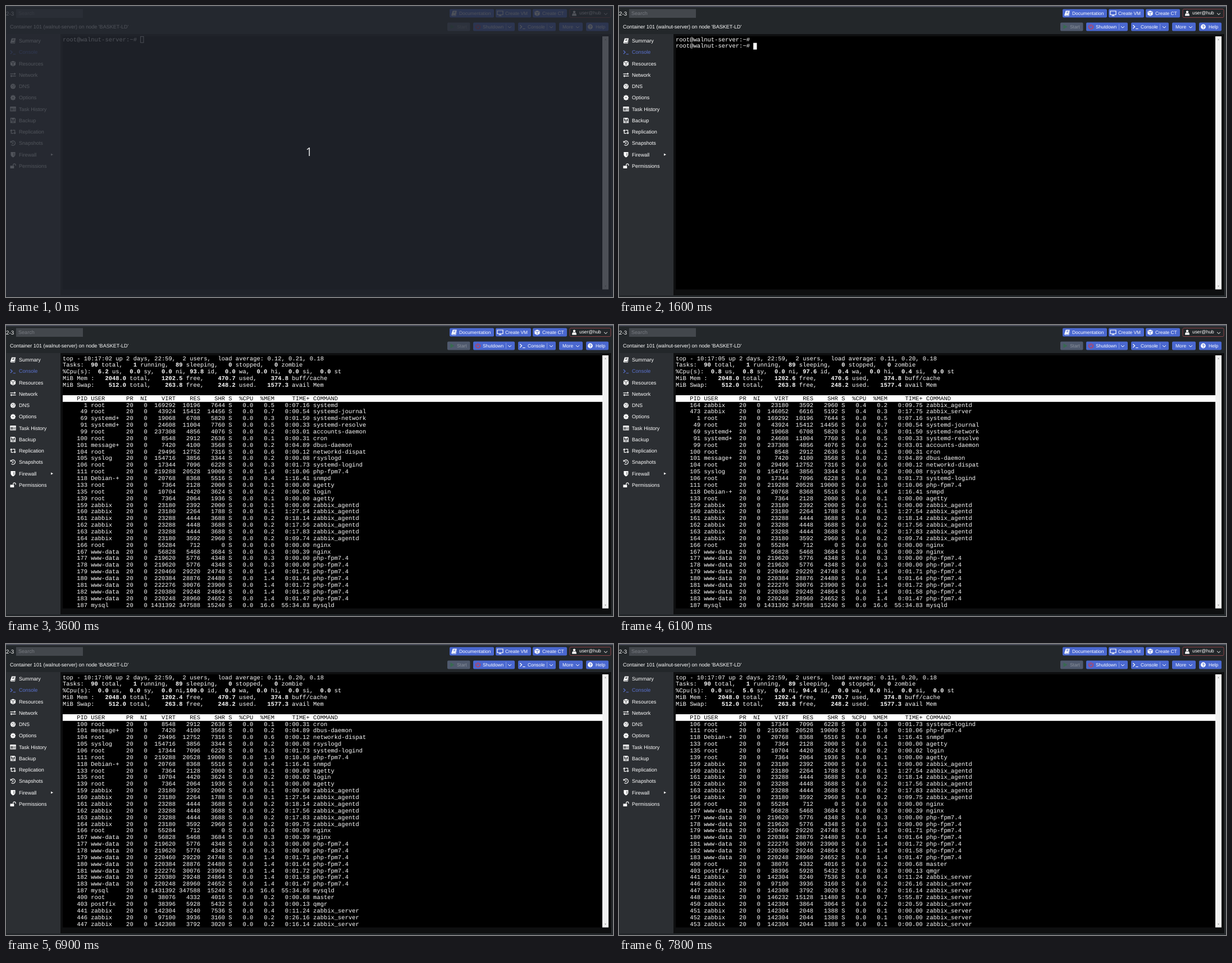
These frames come from a looping animation (1081x518 px, 8000 ms). An HTML page with a canvas:

```html
<!DOCTYPE html>
<html lang="en">
<head>
<meta charset="utf-8">
<title>Container console</title>
<style>
html, body { margin: 0; width: 100%; height: 100%; overflow: hidden; background: #23272a; }
canvas { display: block; width: 1081px; height: 518px; }
</style>
</head>
<body>
<canvas id="stage" width="1081" height="518"></canvas>
<script>
const ctx = document.getElementById('stage').getContext('2d');
const LOOP = 8000;
const ZOOM = 0.698;
const SANS = '"Liberation Sans", Arial, sans-serif';
const MONO = '"Liberation Mono", "Courier New", monospace';
const HEAD = '#23272a', SIDE = '#2c2f33', BLUE = '#4a68d0';
const CELL = { x: 101, y: 53.8, w: 9 * ZOOM, h: 17 * ZOOM };
const PROMPT = 'root@walnut-server:~# ';

function box(x, y, w, h, color) {
  ctx.fillStyle = color;
  ctx.fillRect(x, y, w, h);
}

function text(str, x, y, size, color = '#fff', family = SANS, weight = '') {
  ctx.save();
  ctx.translate(x, y);
  ctx.scale(ZOOM, ZOOM);
  ctx.font = `${weight} ${size}px ${family}`;
  ctx.textRendering = 'geometricPrecision';
  ctx.fillStyle = color;
  ctx.fillText(str, 0, 0);
  ctx.restore();
}

// Icons sit in a 10 px box around their centre: filled, stroked and cut-out parts.
const ICONS = {
  book: ['M-2.3 -4.5H4.8L2.6 3H-3Q-3.6 3.6 -3 3.8H3L4.8 -2V-1L3.3 4.7H-3.5Q-5.2 4 -4.6 2.4Z', '', 'M-1 -2.4H2.6M-1.5 -.6H2'],
  prompt: ['', 'M-4.6 -3L-1.4 0L-4.6 3M.2 3.5H4.6', ''],
  cube: ['M0 -4.8L4.6 -3V2.6L0 5L-4.6 2.6V-3Z', '', 'M-3.8 -2.5L0 -1L3.8 -2.5M0 -1V4'],
  swap: ['M2.4 -4.2L5 -1.9L2.4 .2ZM-2.4 -.2L-5 1.9L-2.4 4.2Z', 'M-5 -1.9H3M5 1.9H-3', ''],
  globe: ['M-4.5 0A4.5 4.5 0 1 1 4.5 0A4.5 4.5 0 1 1 -4.5 0Z', '', 'M-2.2 -2.6L-.5 -1.6L-2.4 .4M1 -3L2.6 -1.4L1.2 .6L2.4 2M-1 1.6L.2 3'],
  gear: ['M-1 -4.6H1L1.4 -3.2L2.7 -4L4 -2.7L3.2 -1.4L4.6 -1V1L3.2 1.4L4 2.7L2.7 4L1.4 3.2L1 4.6H-1L-1.4 3.2L-2.7 4L-4 2.7L-3.2 1.4L-4.6 1V-1L-3.2 -1.4L-4 -2.7L-2.7 -4L-1.4 -3.2Z', '', 'M-.7 0A.7 .7 0 1 1 .7 0A.7 .7 0 1 1 -.7 0Z'],
  list: ['M-5 -4H5V-1.8H-5Z', 'M-4.5 -3.5H4.5V3.5H-4.5ZM-3 -.5H-2M-1 -.5H3.5M-3 1.6H-2M-1 1.6H3.5', ''],
  disk: ['M-2 -4H2V-1.2H-2Z', 'M-4 -4H2.6L4 -2.6V4H-4ZM-2.3 4V1.2H2.3V4', ''],
  cycle: ['M-3.2 -4.4L-.8 -1.5H-5.5ZM3.2 4.4L.8 1.5H5.5Z', 'M-3.2 -2V2.7H1M3.2 2V-2.7H-1', ''],
  history: ['M-4.8 -4.4V-.8H-1.3Z', 'M-3.2 -2.5A4 4 0 1 1 -3 2.7M0 -2V.6H-1.8', ''],
  shield: ['M-4 -4.5H4V0Q4 3 0 5Q-4 3 -4 0Z', '', 'M1.5 -2.8V2.2'],
  lock: ['M-5 -.3H1.8V4.4H-5Z', 'M.3 -.3V-2A2.2 2.2 0 0 1 4.6 -2V-.4', ''],
  screen: ['M-2.5 4H2.5V5H-2.5Z', 'M-5 -4H5V2.5H-5ZM0 2.5V4.5', ''],
  user: ['M-2.2 -2.3A2.2 2.3 0 1 1 2.2 -2.3A2.2 2.3 0 1 1 -2.2 -2.3ZM-3.9 4.4Q-4 .2 -1.8 .1Q0 1.2 1.8 .1Q4 .2 3.9 4.4Z', '', ''],
  play: ['M-3 -4L4 0L-3 4Z', '', ''],
  power: ['', 'M-2.2 -3A3.8 3.8 0 1 0 2.2 -3M0 -4.5V0', ''],
  down: ['', 'M-3 -1.3L0 1.5L3 -1.3', '']
};

function icon(name, x, y, color = '#fff', back = SIDE, width = 1.2) {
  const [fill, line, cut] = ICONS[name];
  ctx.save();
  ctx.translate(x, y);
  ctx.fillStyle = ctx.strokeStyle = color;
  ctx.lineWidth = width;
  ctx.fill(new Path2D(fill));
  ctx.stroke(new Path2D(line));
  ctx.strokeStyle = back;
  ctx.lineWidth = 0.9;
  ctx.stroke(new Path2D(cut));
  ctx.restore();
}

function button(x, y, w, label, labelX, color = BLUE, ink = '#fff', edge) {
  ctx.beginPath();
  ctx.roundRect(x, y, w, 15, 2);
  ctx.fillStyle = color;
  ctx.fill();
  if (edge) {
    ctx.beginPath();
    ctx.roundRect(x + .5, y + .5, w - 1, 15, 2);
    ctx.strokeStyle = edge;
    ctx.lineWidth = 1;
    ctx.stroke();
  }
  text(label, labelX, y + 10.4, 12, ink);
}

const MENU = [
  ['book', 'Summary'], ['prompt', 'Console'], ['cube', 'Resources'], ['swap', 'Network'],
  ['globe', 'DNS'], ['gear', 'Options'], ['list', 'Task History'], ['disk', 'Backup'],
  ['cycle', 'Replication'], ['history', 'Snapshots'], ['shield', 'Firewall'], ['lock', 'Permissions']
];

function triangle(x, y, dx, dy, color) {
  ctx.beginPath();
  ctx.moveTo(x + dx, y + dy);
  ctx.lineTo(x - dx + dy, y - dy + dx);
  ctx.lineTo(x - dx - dy, y - dy - dx);
  ctx.fillStyle = color;
  ctx.fill();
}

function drawPanel() {
  box(0, 0, 1081, 518, HEAD);
  box(0, 0, 1081, 2, '#4b4e5b');
  box(1, 50, 1078, 465, SIDE);

  text('2-3', 0, 16.8, 14);
  box(18, 5.5, 119, 15.5, '#43474c');
  text('Search', 22, 16.4, 13, '#787c82');
  text("Container 101 (walnut-server) on node 'BASKET-LD'", 7, 40.4, 13);

  button(790, 5.5, 79, 'Documentation', 807);
  icon('book', 798, 13, '#fff', BLUE);
  button(872, 5.5, 63, 'Create VM', 889);
  icon('screen', 880, 13);
  button(938, 5.5, 61, 'Create CT', 955);
  icon('cube', 946, 13, '#fff', BLUE);
  button(1003.5, 5, 74, 'user@hub', 1021, HEAD, '#fff', '#8b4347');
  icon('user', 1012, 13);
  icon('down', 1068, 14, '#fff', HEAD, 1);

  button(786, 29.5, 40.5, 'Start', 803, '#4f596d', '#8b929d');
  icon('play', 794.5, 37, '#376b50');
  button(832, 29.5, 74, 'Shutdown', 849);
  icon('power', 840.5, 37, '#d23a48', BLUE, 1.4);
  button(912, 29.5, 67, 'Console', 929);
  icon('prompt', 920, 37);
  button(985, 29.5, 42, 'More', 991);
  button(1033, 29.5, 40, 'Help', 1050);
  ctx.beginPath();
  ctx.arc(1040.5, 37, 4.4, 0, 7);
  ctx.fillStyle = '#fff';
  ctx.fill();
  text('?', 1038.3, 40, 11, BLUE, SANS, 'bold');
  for (const x of [897, 971, 1018]) icon('down', x, 37.5, '#fff', BLUE, 1);
  for (const x of [890, 963]) box(x, 32, 1, 10, '#8297df');

  MENU.forEach(([name, label], i) => {
    const y = 62 + i * 20.24;
    const color = label === 'Console' ? '#5a72d0' : '#fff';
    icon(name, 12.5, y, color);
    text(label, 23, y + 3.2, 13, color);
  });
  triangle(82, 264.5, 2, 0, '#fff');

  box(97, 50, 981, 465, '#0e0f10');
  box(101, 54, 961, 450.5, '#000');
  box(1062, 54, 11, 450.5, '#f1f1f1');
  triangle(1067.5, 59.5, 0, -1.2, '#8c8c8c');
  triangle(1067.5, 499, 0, 1.2, '#8c8c8c');
}

function put(str, row, col = 0, color = '#fff', weight = '') {
  text(str, CELL.x + col * CELL.w, CELL.y + row * CELL.h + 8.7, 15, color, MONO, weight);
}

function putStats(str, row) {
  let col = 0;
  for (const part of str.split(/(\d+\.?\d*)/)) {
    put(part, row, col, '#fff', /^\d/.test(part) ? 'bold' : '');
    col += part.length;
  }
}

function cursor(row, col, hollow) {
  const x = CELL.x + col * CELL.w, y = CELL.y + row * CELL.h;
  if (!hollow) return box(x, y, CELL.w, CELL.h, '#fff');
  ctx.strokeStyle = '#fff';
  ctx.lineWidth = 0.9;
  ctx.strokeRect(x + .5, y + .5, CELL.w - 1, CELL.h - 1);
}

// pid user virt res shr mem time command
const TASKS = `1 root 169292 10196 7644 0.5 0:07.16 systemd
49 root 43924 15412 14456 0.7 0:00.54 systemd-journal
69 systemd+ 19068 6708 5820 0.3 0:01.50 systemd-network
91 systemd+ 24608 11004 7760 0.5 0:00.33 systemd-resolve
99 root 237308 4856 4076 0.2 0:03.01 accounts-daemon
100 root 8548 2912 2636 0.1 0:00.31 cron
101 message+ 7420 4100 3568 0.2 0:04.89 dbus-daemon
104 root 29496 12752 7316 0.6 0:00.12 networkd-dispat
105 syslog 154716 3856 3344 0.2 0:00.08 rsyslogd
106 root 17344 7096 6228 0.3 0:01.73 systemd-logind
111 root 219288 20528 19000 1.0 0:10.06 php-fpm7.4
118 Debian-+ 20768 8368 5516 0.4 1:16.41 snmpd
133 root 7364 2128 2000 0.1 0:00.00 agetty
135 root 10704 4420 3624 0.2 0:00.02 login
139 root 7364 2064 1936 0.1 0:00.00 agetty
159 zabbix 23180 2392 2000 0.1 0:00.00 zabbix_agentd
160 zabbix 23180 2264 1788 0.1 1:27.54 zabbix_agentd
161 zabbix 23288 4444 3688 0.2 0:18.14 zabbix_agentd
162 zabbix 23288 4448 3688 0.2 0:17.56 zabbix_agentd
163 zabbix 23288 4444 3688 0.2 0:17.83 zabbix_agentd
164 zabbix 23180 3592 2960 0.2 0:09.75 zabbix_agentd
166 root 55284 712 0 0.0 0:00.00 nginx
167 www-data 56828 5468 3684 0.3 0:00.39 nginx
177 www-data 219620 5776 4348 0.3 0:00.00 php-fpm7.4
178 www-data 219620 5776 4348 0.3 0:00.00 php-fpm7.4
179 www-data 220460 29220 24748 1.4 0:01.71 php-fpm7.4
180 www-data 220384 28876 24480 1.4 0:01.64 php-fpm7.4
181 www-data 222276 30076 23900 1.4 0:01.72 php-fpm7.4
182 www-data 220380 29248 24864 1.4 0:01.58 php-fpm7.4
183 www-data 220248 28960 24652 1.4 0:01.47 php-fpm7.4
187 mysql 1431392 347588 15240 16.6 55:34.86 mysqld
400 root 38076 4332 4016 0.2 0:00.68 master
403 postfix 38396 5928 5432 0.3 0:00.13 qmgr
441 zabbix 142304 8240 7536 0.4 0:11.24 zabbix_server
446 zabbix 97100 3936 3160 0.2 0:26.16 zabbix_server
447 zabbix 142308 3792 3020 0.2 0:16.14 zabbix_server
448 zabbix 146232 15128 11480 0.7 5:55.87 zabbix_server
450 zabbix 142304 3864 3064 0.2 0:20.59 zabbix_server
451 zabbix 142304 2048 1388 0.1 0:00.00 zabbix_server
452 zabbix 142304 2044 1388 0.1 0:00.00 zabbix_server
453 zabbix 142304 2044 1388 0.1 0:00.00 zabbix_server`.split('\n');

function taskLine(task, cpu = '0.0') {
  const [pid, user, virt, res, shr, mem, time, cmd] = task.split(' ');
  return pid.padStart(7) + ' ' + user.padEnd(10) + '20   0' + virt.padStart(8) +
    res.padStart(7) + shr.padStart(7) + ' S' + cpu.padStart(6) + mem.padStart(6) +
    time.padStart(10) + ' ' + cmd;
}

const without = pid => TASKS.filter(task => !task.startsWith(pid + ' '));
const find = pid => TASKS.find(task => task.startsWith(pid + ' '));
const idle = TASKS.map(task => taskLine(task));
const first = idle.map(line => line.replace('0:09.75', '0:09.74').replace('55:34.86', '55:34.83'));
const polled = [
  taskLine(find('164'), '0.4'),
  taskLine('473 zabbix 146052 6616 5192 0.3 0:17.75 zabbix_server', '0.4'),
  ...without('164').map(task => taskLine(task))
];
const database = [taskLine(find('187'), '5.6'), ...without('187').map(task => taskLine(task))];
const halfway = [...polled.slice(0, 15), ...first.slice(15)];

const QUIET = '0.0 0.0 0.0 100.0 0.0 0.0 0.0 0.0';
const POLL = '0.8 0.8 0.0 97.6 0.4 0.0 0.4 0.0';
const WRITE = '0.0 5.6 0.0 94.4 0.0 0.0 0.0 0.0';
// start, clock second, load, cpu, "free used avail", lines, scroll offset
const SCREENS = [
  [3600, 2, '0.12, 0.21', '6.2 0.0 0.0 93.8 0.0 0.0 0.0 0.0', '1202.5 470.7 1577.3', first, 0],
  [6100, 5, '0.11, 0.20', POLL, '1202.6 470.6 1577.4', halfway, 0],
  [6200, 5, '0.11, 0.20', POLL, '1202.6 470.6 1577.4', polled, 0],
  [6600, 6, '0.11, 0.20', '0.0 2.9 0.0 97.1 0.0 0.0 0.0 0.0', '1202.4 470.7 1577.3', idle, 1],
  [6700, 6, '0.11, 0.20', '5.9 0.0 0.0 94.1 0.0 0.0 0.0 0.0', '1202.4 470.7 1577.3', idle, 3],
  [6900, 6, '0.11, 0.20', QUIET, '1202.4 470.7 1577.3', idle, 5],
  [7300, 6, '0.11, 0.20', '2.6 0.0 0.0 97.4 0.0 0.0 0.0 0.0', '1202.4 470.7 1577.3', idle, 6],
  [7500, 6, '0.11, 0.20', QUIET, '1202.4 470.7 1577.3', idle, 7],
  [7700, 7, '0.11, 0.20', QUIET, '1202.4 470.7 1577.3', database, 9],
  [7800, 7, '0.11, 0.20', WRITE, '1202.4 470.7 1577.3', database, 10]
];
const CPU_KEYS = ['us', 'sy', 'ni', 'id', 'wa', 'hi', 'si', 'st'];

function drawTop(t) {
  const [, sec, load, cpu, memory, lines, offset] = SCREENS.filter(s => s[0] <= t).pop();
  const [free, used, avail] = memory.split(' ').map(v => v.padStart(8));
  put(`top - 10:17:0${sec} up 2 days, 22:59,  2 users,  load average: ${load}, 0.18`, 0);
  putStats('Tasks:  90 total,   1 running,  89 sleeping,   0 stopped,   0 zombie', 1);
  putStats('%Cpu(s):' + cpu.split(' ').map((v, i) => v.padStart(5) + ' ' + CPU_KEYS[i]).join(','), 2);
  putStats(`MiB Mem :   2048.0 total, ${free} free, ${used} used,    374.8 buff/cache`, 3);
  putStats(`MiB Swap:    512.0 total,    263.8 free,    248.2 used. ${avail} avail Mem`, 4);
  box(101, 125, 961, 11.8, '#fff');
  put('    PID USER      PR  NI    VIRT    RES    SHR S  %CPU  %MEM     TIME+ COMMAND', 6, 0, '#000');
  lines.slice(offset, offset + 31).forEach((line, i) => put(line, 7 + i));
}

function drawShell(t) {
  const row = t < 1600 ? 0 : t < 1700 ? 1 : 2;
  const typed = 'top'.slice(0, Math.max(0, Math.floor((t - 2400) / 100)));
  for (let i = 0; i <= row; i++) put(PROMPT, i);
  put(typed, row, PROMPT.length);
  if (t < 3300) cursor(row, PROMPT.length + typed.length, t < 400);
}

function draw(t) {
  drawPanel();
  (t < 3600 ? drawShell : drawTop)(t);
  if (t < 100) {
    box(0, 0, 1081, 518, 'rgba(37, 41, 49, 0.8)');
    text('1', 533.8, 267, 30, '#e2e3e4', '"Open Sans", "Noto Sans", sans-serif');
  }
}

const start = performance.now();
function tick() {
  draw((performance.now() - start) % LOOP);
  requestAnimationFrame(tick);
}
tick();
</script>
</body>
</html>
```
